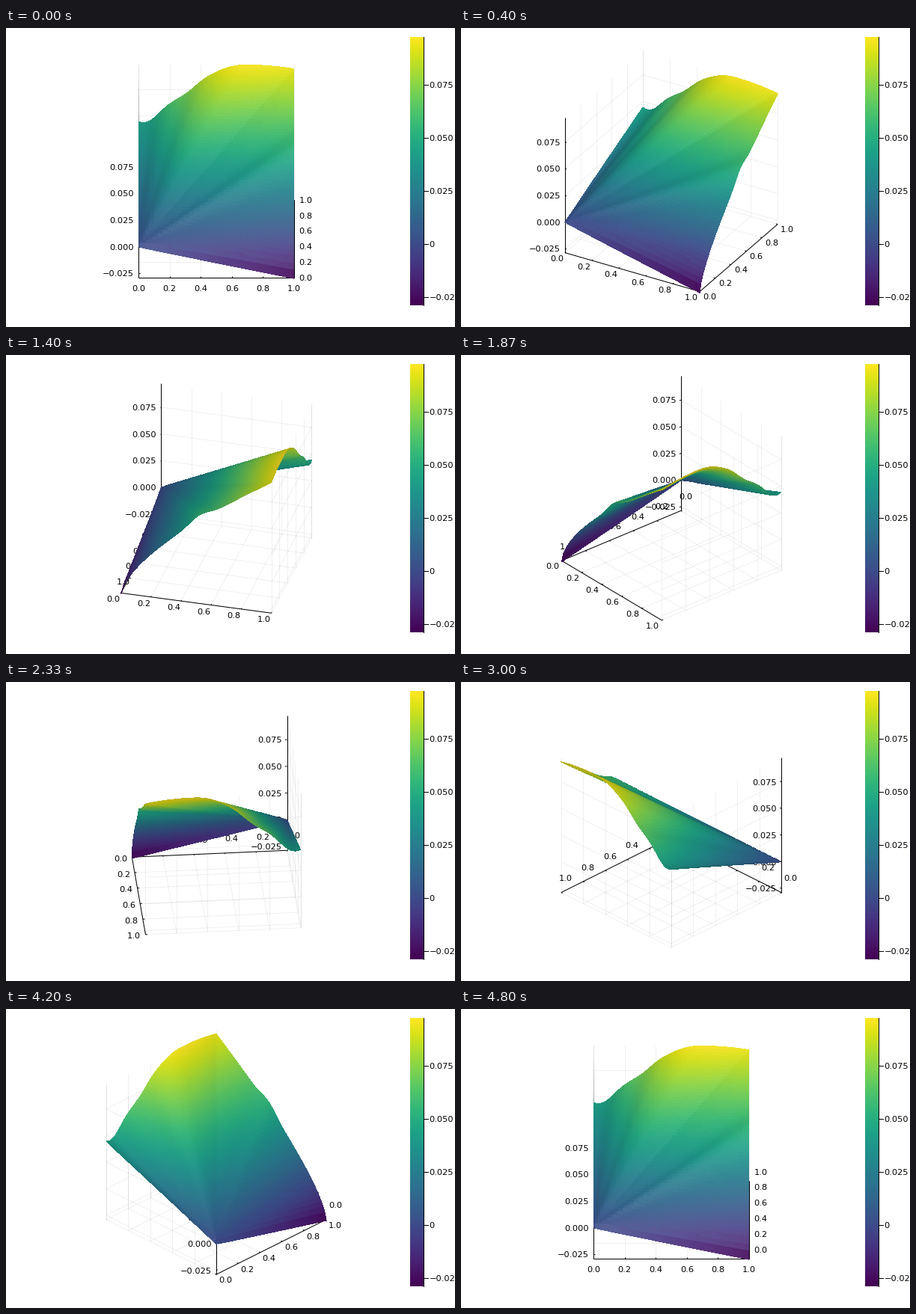
A matplotlib script for the animation above (4.87 s loop, 600 by 400 pixels).

```python
import math

import matplotlib.pyplot as plt
import numpy as np
from matplotlib.animation import FuncAnimation
from matplotlib.collections import LineCollection, PolyCollection

LOOP_MS = 4870
STEPS, SUBSTEPS = 73, 3  # camera positions, ticks per position
CENTER = np.array([281.0, 191.5])
SIZE = 208.0
SIN_E, COS_E = 0.5, math.sqrt(0.75)
Z_MIN, Z_MAX = -0.0288, 0.0975
Z_SPAN = Z_MAX - Z_MIN
Z_PX = SIZE * COS_E
CELLS = 60
PX = 0.72  # points per pixel at 100 dpi
FONT = dict(family="DejaVu Sans", fontsize=11.4 * PX, color="black")

XY_TICKS = np.arange(6) / 5
Z_TICKS = np.arange(-1, 4) * 0.025


def z_unit(z):
    return (z - Z_MIN) / Z_SPAN


def far_profile(s):
    """Height in pixels along y = 1: a rippled rise, a crest, a slight fall."""
    rise = np.sin(np.pi / 2 * np.minimum(s / 0.68, 1) ** 0.85) ** 2
    ripple = np.cos(2 * np.pi * (s - 0.2) / 0.27) * np.maximum(1 - 2 * s, 0)
    fall = (np.maximum(s - 0.7, 0) / 0.3) ** 2
    return 104.5 + 75.2 * rise + 4 * ripple - 5.3 * fall


def side_profile(t):
    """Height in pixels along x = 1: a power curve with one bump."""
    return 174.4 * t ** 0.69 + 7 * np.exp(-((t - 0.52) / 0.09) ** 2)


def surface_height(x, y):
    """Linear along every ray from the origin to the two edge profiles."""
    r = np.maximum(x, y)
    safe = np.maximum(r, 1e-9)
    edge = np.where(y >= x, far_profile(x / safe), side_profile(y / safe))
    zero = z_unit(0)
    return zero + r * (edge / Z_PX - zero)


def project(points, angle):
    x, y, z = np.moveaxis(np.asarray(points, float) - 0.5, -1, 0)
    c, s = math.cos(angle), math.sin(angle)
    right = x * c + y * s
    up = SIN_E * (y * c - x * s) + COS_E * z
    return np.stack([CENTER[0] + SIZE * right, CENTER[1] - SIZE * up], -1)


def build_quads():
    t = np.linspace(0, 1, CELLS + 1)
    x, y = np.meshgrid(t, t)
    p = np.stack([x, y, surface_height(x, y)], -1)
    quads = np.stack([p[:-1, :-1], p[:-1, 1:], p[1:, 1:], p[1:, :-1]], 2)
    return quads.reshape(-1, 4, 3)


def build_grid():
    lines = []
    for t in XY_TICKS:
        lines += [[(t, 0, 0), (t, 1, 0)], [(t, 1, 0), (t, 1, 1)],
                  [(0, t, 0), (1, t, 0)], [(0, t, 0), (0, t, 1)]]
    for z in z_unit(Z_TICKS):
        lines += [[(0, 0, z), (0, 1, z)], [(0, 1, z), (1, 1, z)]]
    return np.array(lines)


def build_axes():
    d = 0.012
    lines = [[(0, 0, 0), (1, 0, 0)], [(1, 0, 0), (1, 1, 0)],
             [(0, 0, 0), (0, 0, 1)]]
    for t in XY_TICKS:
        lines += [[(t, 0, 0), (t, d, 0)], [(1, t, 0), (1 - d, t, 0)]]
    lines += [[(0, 0, z), (d, 0, z)] for z in z_unit(Z_TICKS)]
    return np.array(lines)


def label_layout(px, py):
    """Offset and alignment for a label pushed along the direction (px, py)."""
    n = math.hypot(px, py)
    dx, dy = 6.3 * px / n, 8 * py / n
    if dy < 0:
        return dx, dy - 12.2, "left"
    if abs(dx) < 1e-6:
        return 0, dy + 6.5, "center"
    return dx, dy, "left" if dx > 0 else "right"


def z_text(z):
    return f"{z:.3f}".replace("-", "\u2212")


def add_text(x, y, s, ha):
    return ax.text(x, y + 4.15, s, ha=ha, va="baseline", zorder=3, **FONT)


def draw_colorbar():
    top, bottom, left, right = 12, 371, 540, 558
    ax.imshow(np.arange(256)[:, None], cmap="viridis", origin="lower",
              extent=(left, right, bottom, top), aspect="auto")
    ax.plot([right, right], [top, bottom], color="black", lw=PX)
    for z in Z_TICKS:
        y = bottom - (bottom - top) * z_unit(z)
        ax.plot([right, right + 6], [y, y], color="black", lw=PX)
        add_text(right + 7.6, y, z_text(z) if z else "0", "left")


fig = plt.figure(figsize=(6, 4), dpi=100, facecolor="white")
ax = fig.add_axes([0, 0, 1, 1])
draw_colorbar()
ax.set(xlim=(0, 600), ylim=(400, 0))
ax.axis("off")

quads = build_quads()
mids = quads.mean(1)
normals = np.cross(quads[:, 2] - quads[:, 0], quads[:, 3] - quads[:, 1])
normals /= np.linalg.norm(normals, axis=1, keepdims=True)
base_rgb = plt.get_cmap("viridis")(mids[:, 2])[:, :3]
# Slightly enlarged facets overlap, so no gaps show between them
facets = mids[:, None] + 1.3 * (quads - mids[:, None])
facets[..., :2] = np.clip(facets[..., :2], 0, 1)

grid_lines, axis_lines = build_grid(), build_axes()
grid = LineCollection([], colors=[(0, 0, 0, 0.08)], linewidths=0.55, zorder=1)
frame = LineCollection([], colors="black", linewidths=PX, zorder=2)
surface = PolyCollection([], linewidths=0, edgecolors="none",
                         antialiaseds=False, zorder=4)
for artist in (grid, frame, surface):
    ax.add_collection(artist, autolim=False)

x_labels = [add_text(0, 0, f"{t:.1f}", "left") for t in XY_TICKS]
y_labels = [add_text(0, 0, f"{t:.1f}", "left") for t in XY_TICKS]
z_labels = [add_text(0, 0, z_text(z), "right") for z in Z_TICKS]


def place(labels, points, angle, layout):
    dx, dy, ha = layout
    for label, (x, y) in zip(labels, project(points, angle)):
        label.set_position((x + dx, y + dy + 4.15))
        label.set_ha(ha)


def update(tick):
    step = min((tick + 1) // SUBSTEPS, STEPS - 1)
    angle = math.radians(5 * step)
    c, s = math.cos(angle), math.sin(angle)
    view = np.array([s * COS_E, -c * COS_E, SIN_E])

    grid.set_segments(project(grid_lines, angle))
    frame.set_segments(project(axis_lines, angle))
    place(x_labels, [(t, 0, 0) for t in XY_TICKS], angle,
          label_layout(-SIN_E * s, c))
    place(y_labels, [(1, t, 0) for t in XY_TICKS], angle,
          label_layout(SIN_E * c, s))
    place(z_labels, [(0, 0, z) for z in z_unit(Z_TICKS)], angle,
          (-6.3, 0, "right"))

    # Light comes from the viewer; facets are painted back to front
    facing = np.abs(normals @ view)[:, None]
    rgb = base_rgb * (0.74 + 0.26 * facing)
    rgb += (1 - rgb) * 0.14 * facing ** 16
    order = np.argsort(mids @ view)
    surface.set_verts(project(facets[order], angle))
    surface.set_facecolor(rgb[order])
    return grid, frame, surface


TICKS = STEPS * SUBSTEPS
anim = FuncAnimation(fig, update, frames=TICKS, interval=LOOP_MS / TICKS,
                     repeat=True, repeat_delay=0)
plt.show()
```
